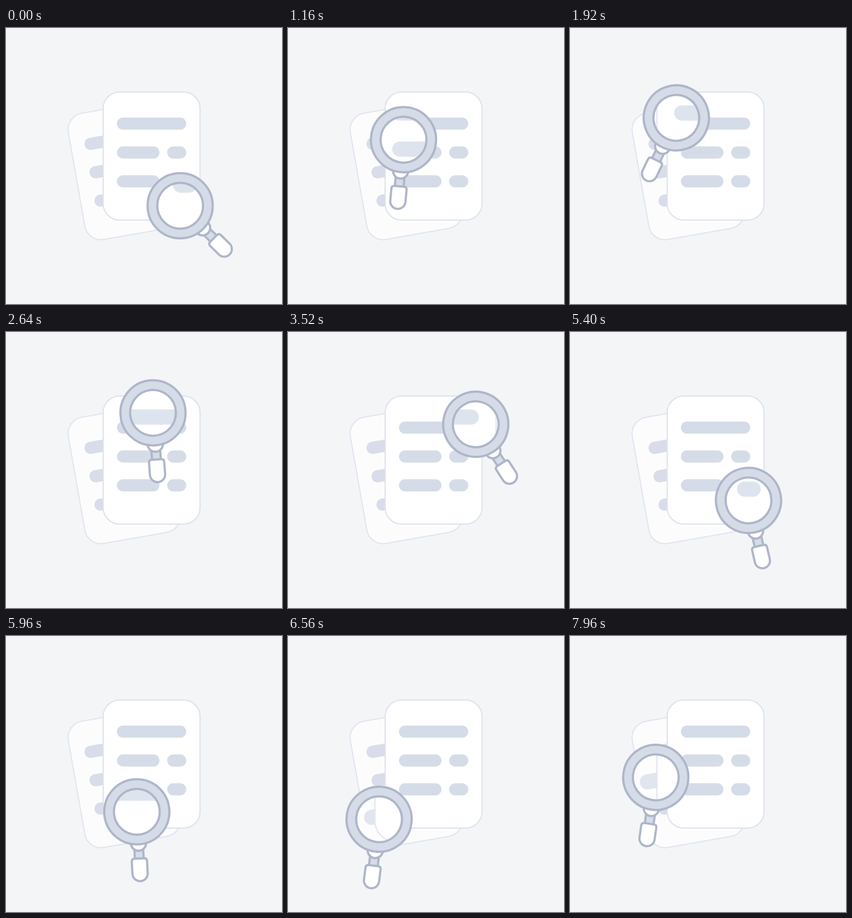
An HTML page that plays this animation: 500x500 px, repeating every 8 s.

```html
<!DOCTYPE html>
<html lang="en">
<head>
<meta charset="utf-8">
<title>Searching documents</title>
<style>
  html, body { margin: 0; width: 100%; height: 100%; overflow: hidden; background: #f3f5f7; }
  svg { display: block; width: 100%; height: 100%; }
  .front { --paper: #fff; --edge: #dde1ec; --bar: #d5dce8; }
  .back { --paper: #fcfcfc; --edge: #e0e4ef; --bar: #d8dde9; }
  .paper { fill: var(--paper); stroke: var(--edge); stroke-width: 2; }
  .bars { stroke: var(--bar); stroke-width: 22; stroke-linecap: round; }
  .line { stroke: #afb6c9; stroke-width: 4; stroke-linejoin: round; }
</style>
</head>
<body>
<svg viewBox="0 0 500 500">
  <defs>
    <g id="doc">
      <rect class="paper" x="-87.75" y="-116" width="175.5" height="232" rx="30"/>
      <path class="bars" d="M-51.75-58.8H51.75M-51.75-6.5H3.25M39.25-6.5H51.75M-51.75 45.7H3.25M39.25 45.7H51.75"/>
    </g>
    <g id="pages">
      <use href="#doc" class="back" transform="translate(214.3 258.8) rotate(-10)"/>
      <use href="#doc" class="front" transform="translate(263.75 232)"/>
    </g>
    <clipPath id="hole"><circle id="holeCircle" r="42"/></clipPath>
  </defs>

  <use href="#pages"/>

  <g clip-path="url(#hole)">
    <rect width="500" height="500" fill="#f3f5f7"/>
    <use href="#pages" transform="translate(250 250) scale(1.25) translate(-250 -250)"/>
    <rect width="500" height="500" fill="#fff" opacity=".22"/>
  </g>

  <g id="glass">
    <g class="line">
      <path d="M-8 62H8V88H-8Z" fill="#d5dce8"/>
      <circle cy="57" r="13.7" fill="#fff"/>
      <path d="M-8.5 84.7H8.5Q13.8 84.7 13.8 90V112A13.8 13.8 0 0 1-13.8 112V90Q-13.8 84.7-8.5 84.7Z" fill="#fff"/>
    </g>
    <g fill="none">
      <circle r="50.3" stroke="#d5dce8" stroke-width="17.6"/>
      <circle class="line" r="59"/>
      <circle class="line" r="41.5"/>
    </g>
  </g>
</svg>
<script>
const LOOP = 8000;
const glass = document.getElementById('glass');
const hole = document.getElementById('holeCircle');

// A pose is [x, y, angle]. Each move eases to a new pose along an arc;
// bend is how far the arc's control point lies from the chord's middle.
const first = [315.5, 322, -45.5];
const moves = [
  { start: 0, time: 1680, to: [187, 167, 28], bend: [-20, 0, -17] },
  { start: 1680, time: 1680, to: [339, 163, -33], bend: [-27, -38, 10] },
  { start: 3360, time: 1480, to: [324, 305, -13], bend: [26, -7, -10] },
  { start: 5360, time: 1200, to: [165, 332, 7], bend: [-15, 0, 0] },
  { start: 7320, time: 1200, to: [147.5, 194, 9], bend: [0, 0, 0] }
];

const ease = u => u * u * (3 - 2 * u);
const clamp = u => Math.min(1, Math.max(0, u));

function poseAt(t) {
  return moves.reduce((from, { start, time, to, bend }) => {
    const p = ease(clamp((t - start) / time));
    return from.map((v, k) => v + (to[k] - v) * p + 2 * p * (1 - p) * bend[k]);
  }, first);
}

function draw(t) {
  const [x, y, angle] = poseAt(t);
  glass.setAttribute('transform', `translate(${x} ${y}) rotate(${angle})`);
  hole.setAttribute('cx', x);
  hole.setAttribute('cy', y);
}

let begin;
function tick(now) {
  begin ??= now;
  draw(Math.max(0, now - begin) % LOOP);
  requestAnimationFrame(tick);
}
draw(0);
requestAnimationFrame(tick);
</script>
</body>
</html>
```
